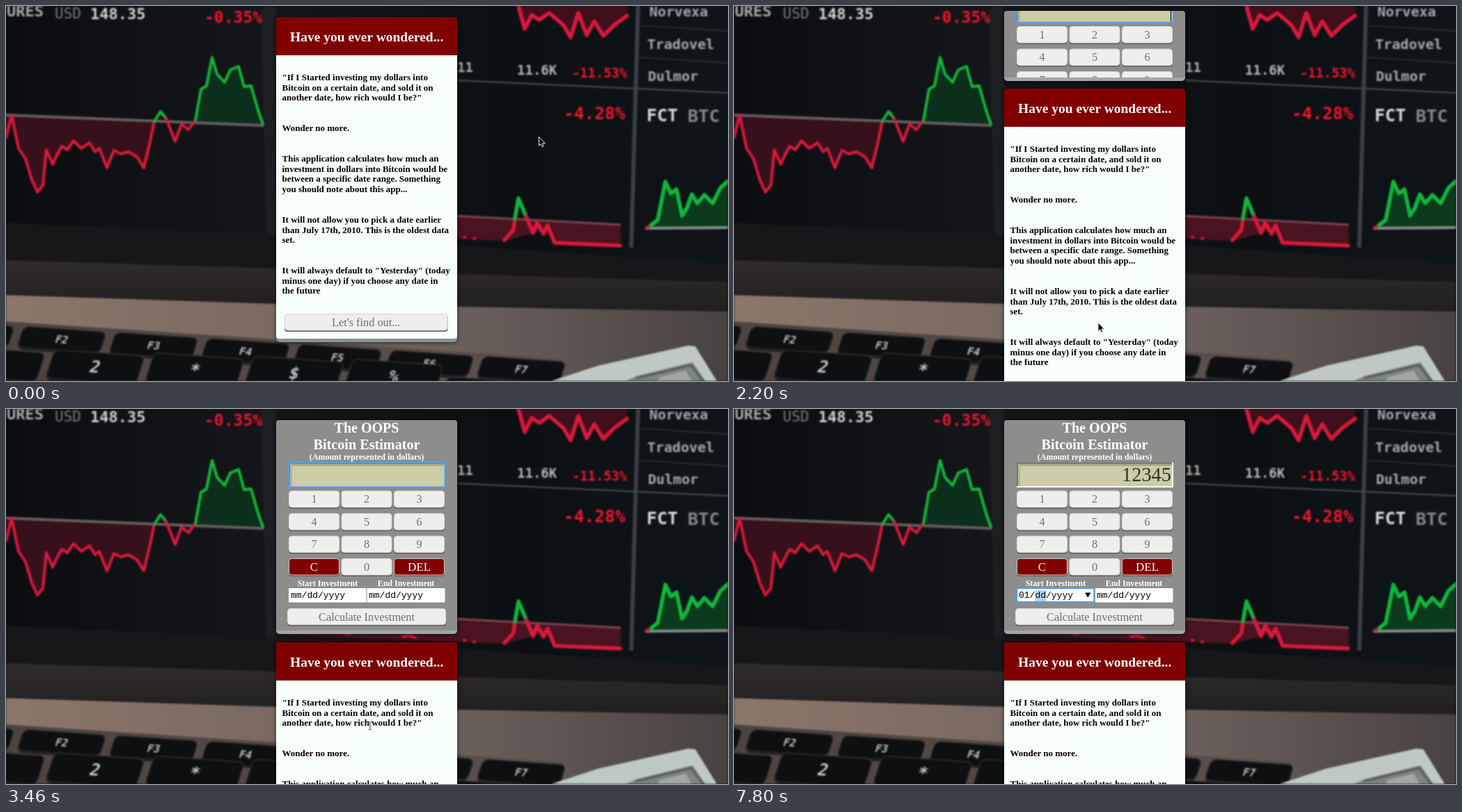
These frames come from a looping animation (1037x540 px, 8000 ms). An HTML page:

```html
<!DOCTYPE html>
<html lang="en">
<head>
<meta charset="utf-8">
<title>Bitcoin investment calculator</title>
<style>
  html, body { margin: 0; width: 100%; height: 100%; overflow: hidden; background: #0d0f12; }
  svg { position: absolute; left: 0; top: 0; display: block; }
  #photo { filter: blur(.9px); }
  #photo text { font-family: "DejaVu Sans Mono", monospace; }
  #app text { font-family: "Liberation Serif", Times, serif; }
  #app .date { font: 13px "Liberation Mono", Courier, monospace; fill: #000; }
  .card { filter: drop-shadow(0 1px 3px rgba(0, 0, 0, .6)); }
  .b { font-weight: bold; }
  .w { fill: #fff; }
  .m { text-anchor: middle; }
  .line { fill: none; stroke-width: 4; stroke-linejoin: round; stroke-linecap: round; }
  .wide { stroke-width: 5.5; }
  .red { stroke: #dc183c; }
  .green { stroke: #0fb83c; }
  .ring { fill: none; stroke: #5a9de0; stroke-width: 2.4; }
</style>
</head>
<body>
<svg id="photo" width="1037" height="540" viewBox="0 0 1037 540"></svg>
<svg id="app" width="1037" height="540" viewBox="0 0 1037 540"></svg>
<script>
const $ = id => document.getElementById(id);
const rect = (x, y, w, h, fill, more = '') =>
  `<rect x="${x}" y="${y}" width="${w}" height="${h}" fill="${fill}" ${more}/>`;
const text = (x, y, size, str, more = '') =>
  `<text x="${x}" y="${y}" font-size="${size}" ${more}>${str}</text>`;
const poly = (points, fill, more = '') => `<polygon points="${points}" fill="${fill}" ${more}/>`;
const line = (points, cls) => `<polyline points="${points}" class="line ${cls}"/>`;
const stroke = (points, color, width) =>
  `<polyline points="${points}" fill="none" stroke="${color}" stroke-width="${width}"/>`;
const glyphs = (x, y, size, str, color) => text(x, y, size, str, `class="b" fill="${color}"`);

function keyboard() {
  const cap = (x, y, w, h, label, size) =>
    `<g transform="translate(${x} ${y}) rotate(4) skewX(-14)">` +
    rect(-w / 2, -h / 2 + 3, w, h, '#1d1a1a', 'rx="9"') +
    rect(-w / 2, -h / 2, w, h, '#0e0f11', 'rx="8" stroke="#2f2c2e" stroke-width="1.5"') +
    text(0, size / 3, size, label, 'class="m b" fill="#c4c4c6"') + '</g>';
  let out = '';
  for (let i = 0; i < 7; i++) out += cap(-52 + 132 * i, 472 + 8.6 * i, 119, 31, 'F' + (i + 1), 15);
  [...' 12*$%'].forEach((c, i) => out += cap(-158 + 143 * i, 511 + 4.5 * i, 130, 42, c, 24));
  return out + cap(690, 556, 124, 36, '', 19);
}

function photo() {
  const leftRed = '0,190 8,157 18,205 28,220 37,250 45,268 53,258 58,207 67,228 73,215 80,202 88,207 97,194 108,205 120,197 128,210 134,205 145,233 155,208 165,213 176,210 188,217 198,233 207,195 213,166';
  const leftGreen = '272,165 280,120 288,115 296,74 303,98 314,110 322,92 334,87 342,116 352,115 362,150 369,170';
  const topRed = '736,0 745,33 755,13 766,20 780,10 792,20 801,28 811,45 822,10 834,42 845,22 858,43 874,27 892,14';
  const rightGreen = '926,316 936,308 947,253 955,270 963,264 971,302 978,291 985,271 993,284 1003,272 1015,284 1026,262 1037,252';
  const bright = '#f0142f';
  return `<defs>
    <linearGradient id="deck"><stop stop-color="#8c776b"/><stop offset=".6" stop-color="#6f625d"/><stop offset="1" stop-color="#474242"/></linearGradient>
    <linearGradient id="well"><stop stop-color="#4d4440"/><stop offset="1" stop-color="#5a504d"/></linearGradient>
    <linearGradient id="screen"><stop stop-color="#0c0d10"/><stop offset=".35" stop-color="#15161a"/><stop offset=".7" stop-color="#0d1013"/><stop offset="1" stop-color="#0e1519"/></linearGradient>
    <linearGradient id="hinge" x2="0" y2="1"><stop stop-color="#302c2b"/><stop offset="1" stop-color="#1f1d1e"/></linearGradient></defs>` +
    rect(-5, -5, 1047, 550, 'url(#screen)') +
    poly('366,-5 388,-5 388,330 374,330', '#1d1e22') +
    poly('-5,312 388,330 648,345 1042,372 1042,420 -5,400', '#17171a') +
    poly('-5,366 388,378 648,386 1042,398 1042,445 -5,420', 'url(#hinge)') +
    poly('-5,416 388,429 648,433 1042,440 1042,545 -5,545', 'url(#deck)') +
    poly('-5,454 388,480 800,508 800,545 -5,545', 'url(#well)') +
    keyboard() +
    poly('768,545 850,518 980,489 990,490 1024,545', '#bfc9c3') +
    poly('880,545 905,533 986,513 1008,545', '#7d8581') +
    stroke('905,536 984,517 1002,541', '#555c5a', 3) +
    poly('932,545 940,534 976,525 988,545', '#a0a8a3') +

    // left chart
    poly(`0,157 ${leftRed} 213,166`, '#36111b') +
    poly(`272,168 ${leftGreen}`, '#0b2f1a') +
    stroke('0,157 370,172', '#675e60', 4) +
    line(leftRed, 'red') + line('213,166 222,152 230,162', 'green') +
    line('230,162 243,195 252,170 262,178 270,167', 'red') + line(leftGreen, 'green') +
    glyphs(1, 15, 22, 'URES', '#aaa') +
    text(70, 18, 21, 'USD', 'fill="#77797c"') +
    glyphs(121, 19, 22, '148.35', '#d2d2d2') +
    glyphs(285, 24, 23, '-0.35%', bright) +

    // right panels
    stroke('648,107 1037,125', '#4a4c51', 2) +
    stroke('908,-5 898,348', '#3b3e43', 6) +
    stroke('912,28 1037,36', '#303438', 1.5) + stroke('910,74 1037,82', '#303438', 1.5) +
    poly(`${topRed} 893,-5`, '#3f0f1b') + line(topRed, 'red wide') +
    glyphs(648, 95, 19, '11', '#aaa') +
    glyphs(734, 99, 19, '11.6K', '#b5b6b8') +
    glyphs(813, 103, 18.8, '-11.53%', bright) +
    glyphs(801, 163, 24.5, '-4.28%', bright) +
    glyphs(924, 15, 20, 'Norvexa', '#a6a8aa') +
    glyphs(921, 62, 20, 'Tradovel', '#a6a8aa') +
    glyphs(922, 108, 20, 'Dulmor', '#a6a8aa') +
    glyphs(920, 166, 25, 'FCT', '#dadada') +
    glyphs(979, 167, 25.5, 'BTC', '#85888b') +

    // lower right charts
    poly('388,288 883,315 883,344 786,341 775,322 716,338 388,325', '#4a1320') +
    stroke('388,288 883,315', '#79454f', 3) +
    line('480,318 490,324 502,320', 'red') + line('570,328 578,326 588,329', 'red') +
    line('658,333 659,333', 'red') + line('672,335 673,335', 'red') +
    line('716,337 729,322 731,306', 'red wide') + line('731,306 736,277 747,303', 'green wide') +
    line('747,303 757,327 763,312 772,328 778,316 788,341 882,345', 'red wide') +
    poly(`926,319 ${rightGreen} 1037,319`, '#0b3a1c') +
    stroke('918,320 1037,319', '#8b8d8c', 4) + line(rightGreen, 'green wide') +
    line('920,319 924,318', 'red');
}

function button(x, y, w, h, label, more = '', dark = false) {
  return rect(x, y + 1.5, w, h, '#60605f', 'rx="4"') +
    rect(x + .5, y + .5, w - 1, h - 1, dark ? '#800000' : '#eeeeec', `rx="4" stroke="${dark ? '#cfc4c2' : '#d6d6d4'}" ${more}`) +
    text(x + w / 2, y + h / 2 + 5.5, dark ? 17 : 16.3, label, `class="m" fill="${dark ? '#fff' : '#6e6e6e'}"`);
}

const keyX = [406, 481.5, 557], keyY = [117.5, 150, 182.5, 215];

function calculator() {
  const keys = ['1', '2', '3', '4', '5', '6', '7', '8', '9', 'C', '0', 'DEL'];
  return `<clipPath id="calcClip">${rect(388, 16, 260, 303, '#000', 'id="clip" rx="4"')}</clipPath>` +
    `<g id="calc" class="card">` + rect(388, 16, 260, 308, '#a2a6a8', 'id="edge" rx="5"') +
    rect(388, 16, 260, 303, '#8d8d8b', 'id="panel" rx="4"') +
    `<g clip-path="url(#calcClip)"><g id="body">` +
    text(518, 34, 20, 'The OOPS', 'class="m b w"') +
    text(518, 57.5, 20.2, 'Bitcoin Estimator', 'class="m b w"') +
    text(518, 73, 12, '(Amount represented in dollars)', 'class="m b w"') +
    rect(406, 77, 225, 36, '#fff') + rect(406, 77, 223, 34, '#777774') +
    rect(408, 79, 221, 32, '#cccca6') +
    rect(408, 79, 221, 3, '#a5a588') + rect(408, 79, 3, 32, '#b4b494') +
    text(628, 104, 28.4, '', 'id="amount" text-anchor="end" fill="#333"') +
    rect(627, 79, 1, 32, '#000', 'id="caret"') +
    rect(406, 77, 224.5, 35.5, 'none', 'id="inputRing" class="ring" rx="1"') +
    keys.map((k, i) => button(keyX[i % 3], keyY[i / 3 | 0], 73, 24.5, k, '', k === 'C' || k === 'DEL')).join('') +
    rect(0, 0, 75, 26.5, 'none', 'id="keyRing" class="ring" rx="4"') +
    text(462, 254.5, 12, 'Start Investment', 'class="m b w"') +
    text(574.5, 254.5, 12, 'End Investment', 'class="m b w"') +
    rect(406, 258, 111.5, 20.5, '#fff') + rect(518.5, 258, 112, 20.5, '#fff') +
    rect(0, 261, 16, 16, '#b0d4fb', 'id="mark"') +
    text(409, 272, 13, '', 'id="start" class="date"') + text(521, 272, 13, 'mm/dd/yyyy', 'class="date"') +
    `<g id="picked">${poly('504,264.5 512.5,264.5 508.2,271.5', '#000')}` +
    rect(406, 258, 111.5, 20, 'none', 'class="ring"') + '</g>' +
    button(404, 287, 228, 24, 'Calculate Investment') +
    '</g></g></g>';
}

function intro() {
  const paragraphs = [
    [103, '"If I Started investing my dollars into', 'Bitcoin on a certain date, and sold it on', 'another date, how rich would I be?"'],
    [176, 'Wonder no more.'],
    [220, 'This application calculates how much an', 'investment in dollars into Bitcoin would be', 'between a specific date range. Something', 'you should note about this app...'],
    [308, 'It will not allow you to pick a date earlier', 'than July 17th, 2010. This is the oldest data', 'set.'],
    [381, 'It will always default to "Yesterday" (today', 'minus one day) if you choose any date in', 'the future']];
  return `<g id="intro" class="card">` + rect(388, 18, 260, 466, '#8b9294', 'rx="5"') +
    rect(388, 30, 260, 449, '#f7fffb', 'rx="4"') +
    `<path d="M388 71V20q0-4 4-4H644q4 0 4 4V71Z" fill="#800000"/>` +
    text(408, 50.5, 19.5, 'Have you ever wondered...', 'class="b w"') +
    paragraphs.map(([y, ...rows]) => rows.map((row, i) =>
      text(396.5, y + 4 + 14.7 * i, 13, row, 'class="b"')).join('')).join('') +
    button(400, 443, 234.5, 24.5, "Let's find out...", 'id="go"') + '</g>';
}

const cursors = {
  arrow: '<path d="M0 0V12.5L2.8 10 4.7 14.3 6.7 13.4 4.9 9.2H8.8Z" fill="#000" stroke="#eee"/>',
  hand: '<path d="M-1 7V.8a1.1 1.1 0 0 1 2.2 0V5l4.4 1.2q1.6.5 1.3 2.2L6 13.5H.2L-3.6 8.6q-.4-1.6 1-1.4Z" fill="#fff" stroke="#222"/>',
  beam: '<path d="M-2.5-6Q-.4-6 0-4.6 .4-6 2.5-6M0-4.6V4.6M-2.5 6Q-.4 6 0 4.6 .4 6 2.5 6" fill="none" stroke="#444"/>'
};

$('photo').innerHTML = photo();
$('app').innerHTML = intro() + calculator() +
  Object.entries(cursors).map(([id, shape]) => `<g id="${id}">${shape}</g>`).join('');

const LOOP = 8000, SLIDE = [1976, 2576];
const presses = [[3800, 1], [4430, 2], [4600, 3], [4930, 4], [5230, 5]];
const home = [765.5, 188.5], rest = [523, 456], dateSpot = [437.5, 273];
const ease = p => .5 - Math.cos(Math.PI * Math.min(1, Math.max(0, p))) / 2;
const show = (id, on) => $(id).setAttribute('visibility', on ? 'inherit' : 'hidden');
const move = (id, x, y) => $(id).setAttribute('transform', `translate(${x} ${y})`);

function drawCards(t) {
  const sliding = t < SLIDE[1], open = t >= SLIDE[0];
  let height = 308, top = 16, shift = 0, push = 320;
  if (sliding) {
    height = Math.round(5 + 310 * ease((t - SLIDE[0]) / (SLIDE[1] - SLIDE[0])));
    top = 7;
    // the focused field keeps the body scrolled until it fits
    shift = 6.5 - Math.min(86, 315 - height);
    push = open ? height + 2 : 0;
  }
  show('calc', open);
  move('calc', 0, top - 16);
  move('body', 0, shift);
  move('intro', 0, push);
  $('edge').setAttribute('height', height);
  for (const id of ['panel', 'clip']) $(id).setAttribute('height', height - 5);
  $('go').setAttribute('stroke', t >= 1860 && t < SLIDE[0] ? '#777' : '#d6d6d4');
}

function drawFields(t) {
  const typed = presses.filter(p => t >= p[0]);
  const last = typed[typed.length - 1];
  const picking = t >= 6300;
  $('amount').textContent = typed.map(p => p[1]).join('');
  show('inputRing', !last);
  show('caret', !last && t >= 1960 && Math.floor((t - 1960) / 500) % 2 === 0);
  show('keyRing', last && !picking);
  if (last) {
    const i = last[1] - 1;
    move('keyRing', keyX[i % 3] - 1, keyY[i / 3 | 0] - 1);
    $('keyRing').setAttribute('opacity', Math.min(1, .3 + (t - last[0]) / 100));
  }
  show('picked', picking);
  show('mark', picking);
  $('mark').setAttribute('x', t < 7630 ? 409 : 432.5);
  $('start').textContent = (t < 6960 ? 'mm' : t < 7630 ? '00' : '01') + '/dd/yyyy';
}

function drawCursor(t) {
  const first = ease((t - 860) / 440), second = ease((t - 5560) / 400);
  const [from, to, p] = t < 3800 ? [home, rest, first] : [rest, dateSpot, second];
  let kind = 'arrow';
  if (t < SLIDE[0]) kind = first > .95 ? 'hand' : 'arrow';
  else if (t >= 2500 && t < 3800) kind = 'beam';
  else if (t >= 3800 && t < 5560 || t >= 6960) kind = '';
  for (const id in cursors) {
    show(id, id === kind);
    move(id, from[0] + (to[0] - from[0]) * p, from[1] + (to[1] - from[1]) * p);
  }
}

const begin = performance.now();
function frame() {
  const t = (performance.now() - begin) % LOOP;
  drawCards(t);
  drawFields(t);
  drawCursor(t);
  requestAnimationFrame(frame);
}
frame();
</script>
</body>
</html>
```
